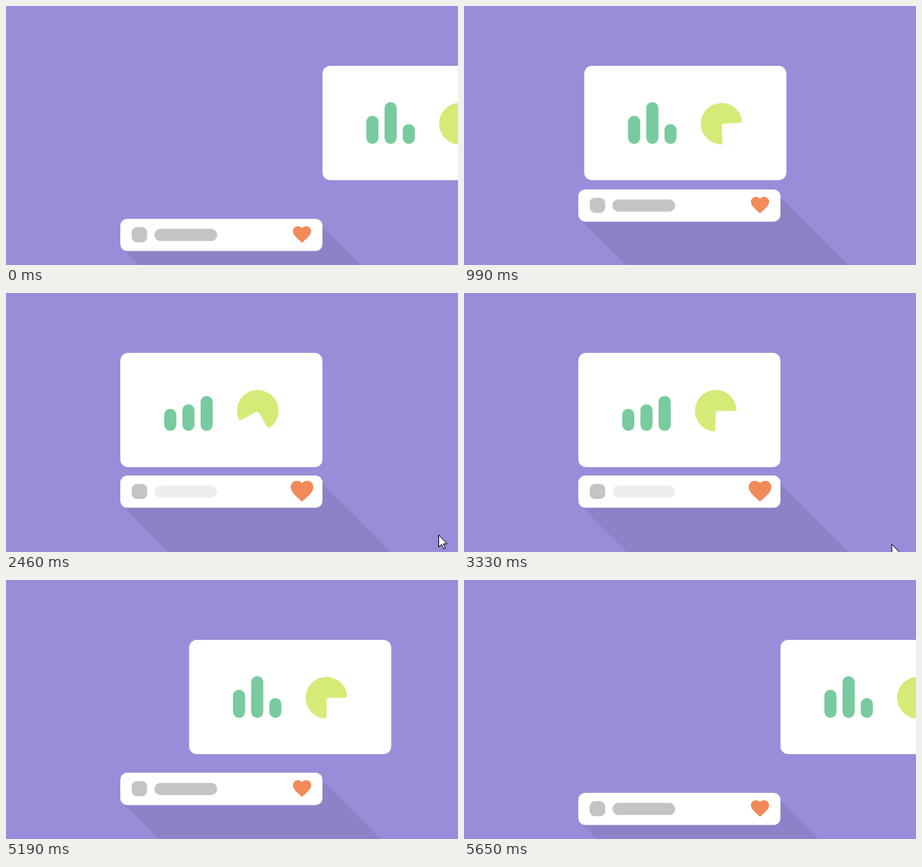
Animation of 597x342 px, one loop 6.35 s. Source, as an HTML page:

```html
<!DOCTYPE html>
<html lang="en">
<head>
<meta charset="utf-8">
<title>Dashboard card</title>
<style>
  html, body { margin: 0; width: 100%; height: 100%; overflow: hidden; background: #998dda; }
  svg { display: block; width: 597px; height: 342px; }
</style>
</head>
<body>
<svg viewBox="0 0 597 342">
  <g id="row">
    <path fill="#8d82c8" d="M151 37l400 400H818V410.5L418 10.5Z"/>
    <rect x="151" width="267" height="42.6" rx="9" fill="#fff"/>
    <rect x="166" y="11" width="20.5" height="20" rx="7" fill="#c4c4c4"/>
    <rect id="pill" x="196" y="13.3" width="83" height="16" rx="8"/>
    <path id="heart" fill="#f28a5a" d="M12 21.35l-1.45-1.32C5.4 15.36 2 12.28 2 8.5 2 5.42 4.42 3 7.5 3c1.74 0 3.41.81 4.5 2.09C13.09 3.81 14.76 3 16.5 3 19.58 3 22 5.42 22 8.5c0 3.78-3.4 6.86-8.55 11.54Z"/>
  </g>
  <g id="card">
    <rect y="79" width="267" height="151" rx="10" fill="#fff"/>
    <g id="bars" fill="#78cb9f">
      <rect x="58" width="16" rx="8"/>
      <rect x="82" width="16" rx="8"/>
      <rect x="106" width="16" rx="8"/>
    </g>
    <path id="pie" fill="#d4eb78" d="M0 4Q0 0 4 0H24Q27.8 -.2 27.2 -4A27.5 27.5 0 1 0 -4 27.2Q-.2 27.8 0 24Z"/>
  </g>
  <path id="cursor" fill="#fff" stroke="#000" d="M0 0V16L3.7 12.6 6.5 18.4 8.8 17.3 6 11.7H11Z"/>
</svg>
<script>
const LOOP = 6350;
const BASE = 182;
const BAR_TOPS = [[145, 153], [127, 147], [156, 136]];
// Pointer path: time, x, y
const POINTER = [
  [1600, 538, 343], [1740, 532, 320], [1890, 561, 335], [2100, 575, 325],
  [2300, 571, 319], [2590, 571, 319], [3000, 566, 326], [3280, 566, 326], [3450, 561, 343]
];

const $ = id => document.getElementById(id);
const place = (id, transform) => $(id).setAttribute('transform', transform);
const mix = (a, b, p) => a + (b - a) * p;
const easeOut = x => 1 - (1 - x) ** 2;
const easeInOut = x => x < .5 ? 2 * x * x : 1 - 2 * (1 - x) ** 2;
const span = (t, start, end) => Math.min(1, Math.max(0, (t - start) / (end - start)));

// Goes 0 to 1 over the first span and back to 0 over the second
const there = (t, ease, a, b, c, d) => ease(span(t, a, b)) - ease(span(t, c, d));

function movePointer(t) {
  const i = POINTER.findIndex(p => p[0] > t);
  $('cursor').style.display = i > 0 ? '' : 'none';
  if (i < 1) return;
  const [t0, x0, y0] = POINTER[i - 1], [t1, x1, y1] = POINTER[i];
  const p = span(t, t0, t1);
  place('cursor', `translate(${mix(x0, x1, p) + .5} ${mix(y0, y1, p) + .5})`);
}

function draw(t) {
  const slide = there(t, easeOut, 508, 1090, 5085, 5650);
  const spin = there(t, easeInOut, 843, 3116, 3270, 4800);
  const active = there(t, easeInOut, 1240, 1890, 4140, 4770);

  place('card', `translate(${mix(418, 151, slide)} 0)`);
  place('row', `translate(0 ${mix(281, 241, slide)})`);
  place('pie', `translate(181.5 155.5) rotate(${-360 * spin})`);
  place('heart', `translate(391 20.8) scale(${mix(1.2, 1.5, active)}) translate(-12 -12.2)`);

  const grey = Math.round(mix(196, 238, active));
  $('pill').setAttribute('fill', `rgb(${grey},${grey},${grey})`);

  BAR_TOPS.forEach(([rest, raised], i) => {
    const bar = $('bars').children[i], top = mix(rest, raised, active);
    bar.setAttribute('y', top);
    bar.setAttribute('height', BASE - top);
  });
  movePointer(t);
}

const begin = performance.now();
function tick() {
  draw((performance.now() - begin) % LOOP);
  requestAnimationFrame(tick);
}
tick();
</script>
</body>
</html>
```
